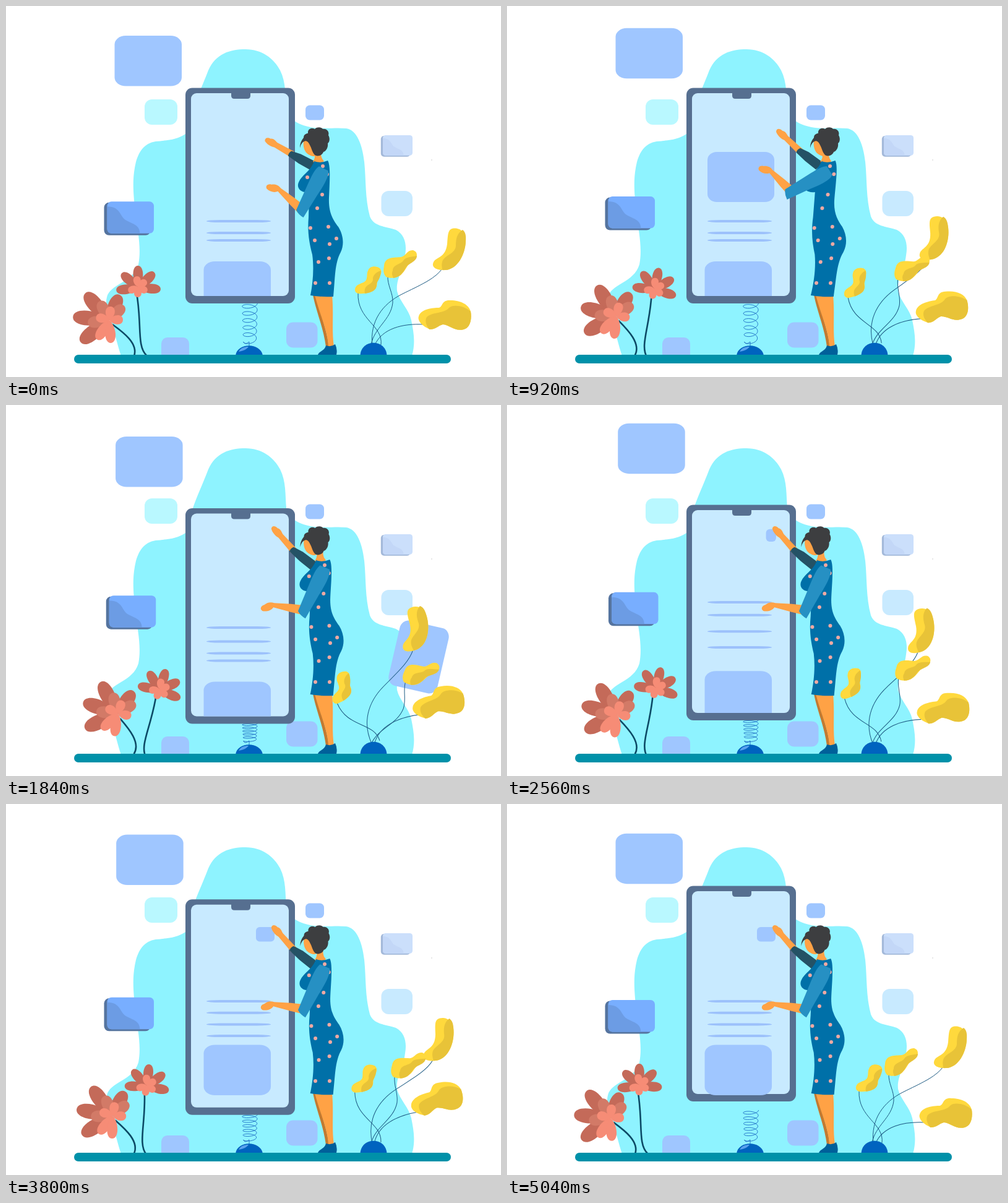
Write an HTML page that moves like this. It is 800 by 600 pixels and loops after 5.08 s.

```html
<!DOCTYPE html>
<html lang="en">
<head>
<meta charset="utf-8">
<title>Building an app screen</title>
<style>
html, body { margin: 0; width: 100%; height: 100%; overflow: hidden; background: #fff; }
svg { display: block; width: 800px; height: 600px; }
.tile { fill: #9fc6ff; }
.skin { fill: #ffa245; }
.stem { fill: none; stroke: #0c4a66; stroke-width: 2.6; }
.thin { fill: none; stroke: #1c5a82; stroke-width: 1; }
.leaf { fill: #ffd93d; }
.shade { fill: #e8c338; }
.dots { fill: none; stroke: #efa9a3; stroke-width: 6; stroke-linecap: round; }
</style>
</head>
<body>
<svg viewBox="0 0 800 600">
  <defs>
    <clipPath id="clip"><rect id="clipRect" x="299" width="158" rx="8"/></clipPath>
  </defs>

  <path fill="#8ef3ff" d="M186 566C180 548 177 532 170 512C164 496 160 482 163 471C168 449 205 448 214 418C219 392 213 365 209 335C206 305 204 285 208 262C212 238 222 222 242 219C264 217 276 216 290 207L301 170C308 148 318 128 327 104C339 77 362 70 387 70C414 70 433 85 443 104C453 124 451 145 453 167C458 184 470 191 492 196C515 200 530 196 550 198C568 201 576 226 579 252C582 280 580 310 588 340C594 357 613 356 630 362C645 370 648 386 645 403C642 428 630 441 632 461C636 478 651 490 655 508C659 528 662 545 656 566Z"/>
  <circle cx="688" cy="249" r=".7" fill="#bbb"/>

  <rect id="bigTile" class="tile" width="108.5" height="81.5" rx="18" ry="14"/>
  <rect x="224" y="151" width="53" height="41" rx="12" fill="#b9f8ff"/>
  <rect class="tile" x="484" y="160.5" width="30" height="24" rx="7"/>
  <rect x="606.5" y="299" width="50.5" height="41" rx="12" fill="#c8eaff"/>
  <rect class="tile" x="251" y="536" width="45" height="40" rx="10"/>
  <rect class="tile" x="453" y="511.5" width="50.5" height="41" rx="11"/>
  <g id="blueBlock">
    <rect x="-5" y="1.5" width="75" height="53" rx="8" fill="#55749f"/>
    <rect width="75.5" height="51.5" rx="7" fill="#78aeff"/>
    <path fill="#6c9ce4" d="M0 8C22 8 20 24 30 30C42 37 52 37 53 51.5H7Q0 51 0 44Z"/>
  </g>
  <g transform="translate(609 209) scale(.636)">
    <rect x="-5" y="1.5" width="75" height="53" rx="8" fill="#a3b9da"/>
    <rect width="75.5" height="51.5" rx="7" fill="#cbdffb"/>
    <path fill="#c3d7f7" d="M0 8C22 8 20 24 30 30C42 37 52 37 53 51.5H7Q0 51 0 44Z"/>
  </g>

  <path id="spring" fill="none" stroke="#1f6fc4" stroke-width=".9"/>
  <path fill="#0063bf" d="M371 565C374 544 411 544 415 565Z"/>
  <path fill="#5aa2ee" d="M376 559C379 553 385 551 392 551C388 556 383 558 376 559Z"/>

  <g id="phone">
    <rect x="290" y="132.5" width="177" height="348.5" rx="11" fill="#566f90"/>
    <rect x="299" y="141" width="158" height="328" rx="9" fill="#c8eaff"/>
    <path fill="#566f90" d="M364 140H395V145Q395 150 390 150H369Q364 150 364 145Z"/>
  </g>
  <g clip-path="url(#clip)">
    <rect id="card" class="tile" x="319.5" width="108.5" height="81.5" rx="18" ry="14"/>
    <g id="lines" fill="#9cc1fb"></g>
  </g>
  <rect id="thrown" class="tile" x="-54" y="-40.5" width="108" height="81" rx="15" ry="13"/>
  <rect id="pinned" class="tile" rx="6"/>

  <path fill="#c27a31" d="M496 467H503C508 500 519 525 522 551H517C513 520 500 490 496 467Z"/>
  <path class="skin" d="M499 467H527C530 500 526 522 530 551H521C520 525 506 496 499 467Z"/>
  <path fill="#00609a" d="M517 549Q525 552 532 547Q536 555 534 564H504C506 558 515 558 517 549Z"/>
  <path id="backFore" class="skin" d="M-3 -5L28 -4C33 -6 41 -6 46 -3C49 1 46 5 40 5C36 8 32 6 28 5L-3 6Z"/>
  <path id="backSleeve" fill="#245265" d="M-4 -8L28 -7.5L44 -4.5Q47 1 45 5L24 7.5L0 8Z"/>
  <g id="body">
    <path class="skin" d="M499 238H509Q509 246 514 251L506 256L496 252Q500 246 499 238Z"/>
    <path fill="#0070a8" d="M498 251Q508 255 520 250C525 258 523 285 522 310C521 335 529 346 537 357C545 370 547 385 541 398C531 416 532 440 529 470Q510 471 492 468C496 448 498 424 495 402C490 383 487 365 489 342L490 301C476 303 469 294 473 285C478 273 492 268 498 251Z"/>
    <path class="dots" d="M512 259h0M519 272h0M487 277h0M511 305h0M503 327h0M492 359h0M521 357h0M499 379h0M534 376h0M523 385h0M505 414h0M522 408h0M500 448h0M523 448h0"/>
  </g>
  <path id="frontFore" class="skin" d="M-3 -8L20 -4L48 2C51 -3 58 -6 65 -5C70 -3 69 3 63 5C59 9 53 11 47 9L20 9L-3 8Z"/>
  <path id="frontSleeve" fill="#2690c3" d="M-4 -9C4 -13 15 -12 30 -11L78 -7Q83 0 83 9L40 11C20 13 0 13 -5 7Z"/>
  <g id="head">
    <path class="skin" d="M481 218H490C495 224 498 232 502 241C498 246 489 241 485 237C481 231 480 226 481 218Z"/>
    <path fill="#3d3e40" d="M475 230C475 221 478 217 481 213C481 208 485 206 488 206C487 199 494 196 499 199C503 195 510 196 512 199C518 198 523 203 521 209C524 214 523 220 520 222C521 229 517 235 513 236C511 242 503 244 499 241C495 237 494 230 491 225C489 220 485 217 482 219C478 221 476 225 475 230Z"/>
  </g>

  <g id="bigFlower"><path class="stem" d="M207 566C214 546 190 528 172 515"/></g>
  <g id="smallFlower"><path class="stem" d="M227 565C211 550 220 515 211 464"/></g>

  <g id="leafA">
    <path class="thin" d="M592 548C588 510 608 482 640 466C668 452 692 442 704 426"/>
    <path class="leaf" d="M719 361C727 357 744 361 743 381C742 402 730 425 711 427C699 428 686 424 691 414C696 405 710 408 713 385C714 372 714 364 719 361Z"/>
    <path class="shade" d="M738 362C728 368 727 378 727 388C726 400 712 402 706 411C703 418 705 422 705 427H711C730 425 742 402 743 381C744 370 742 365 738 362Z"/>
  </g>
  <g id="leafB">
    <path class="thin" d="M590 548C595 520 622 508 625 480C626 464 616 452 617 436"/>
    <path class="leaf" d="M611 420C612 405 628 407 638 406C646 405 648 394 658 395C667 398 665 408 658 412C648 417 648 425 640 433C633 441 620 441 614 438C609 432 610 426 611 420Z"/>
    <path class="shade" d="M664 404C655 406 645 406 642 412C638 418 625 418 625 428C622 434 626 438 626 440C636 439 642 431 645 425C649 416 664 414 664 404Z"/>
  </g>
  <g id="leafC">
    <path class="thin" d="M606 548C610 516 567 508 569 464"/>
    <path class="leaf" d="M585 428C588 420 598 420 604 424C608 428 607 433 603 438C597 446 602 448 598 456C593 464 580 466 569 465C562 463 563 456 567 452C574 447 582 448 583 440C584 434 583 432 585 428Z"/>
    <path class="shade" d="M606 428C598 430 592 436 593 443C592 450 582 450 580 458Q579 462 580 465C592 463 598 460 599 452C598 446 606 442 606 428Z"/>
  </g>
  <g id="leafD">
    <path class="thin" d="M596 548C608 522 640 513 676 515"/>
    <path class="leaf" d="M667 502C670 490 690 488 700 488C706 486 704 475 718 476C735 476 748 483 751 494C753 505 751 520 740 523C725 527 718 516 706 515C698 517 695 523 686 523C676 520 664 510 667 502Z"/>
    <path class="shade" d="M751 494C740 484 722 482 716 488C708 498 690 494 680 503C676 510 680 518 684 523C695 523 698 517 706 515C718 516 725 527 740 523C751 520 753 505 751 494Z"/>
  </g>
  <path fill="#0063bf" d="M572.5 565C574 538 614 538 615.5 565Z"/>
  <rect x="110" y="564" width="609" height="14" rx="7" fill="#0091a9"/>
</svg>
<script>
const LOOP = 5080, STEP = 40;
const REACH = 920, REST = 1840;
const $ = id => document.getElementById(id);

function set(el, attrs) {
  for (const name in attrs) el.setAttribute(name, attrs[name]);
}
function add(parent, tag, attrs) {
  const el = document.createElementNS('http://www.w3.org/2000/svg', tag);
  set(el, attrs);
  return parent.appendChild(el);
}
const move = (id, transform) => $(id).setAttribute('transform', transform);
const degrees = (x, y) => Math.atan2(y, x) * 180 / Math.PI;
const mix = (a, b, u) => a + (b - a) * u;

// Eased 0 to 1, and eased up to a peak and back.
function ramp(t, from, to) {
  const u = Math.min(1, Math.max(0, (t - from) / (to - from)));
  return u * u * (3 - 2 * u);
}
const pulse = (t, from, peak, to) => t < peak ? ramp(t, from, peak) : 1 - ramp(t, peak, to);

// The woman moves from a start pose through a reach to a resting pose.
const pose = (t, start, reach, rest) =>
  t < REACH ? mix(start, reach, ramp(t, 0, REACH)) : mix(reach, rest, ramp(t, REACH, REST));
const joint = (...poses) => t => [0, 1].map(axis => pose(t, ...poses.map(p => p[axis])));

// Petals spread evenly between two angles.
function fan(id, x, y, fill, count, from, to, length, width) {
  const h = width * .66;
  for (let i = 0; i < count; i++) {
    const angle = mix(from, to, count > 1 ? i / (count - 1) : 0);
    add($(id), 'path', {
      fill, transform: `translate(${x} ${y}) rotate(${angle})`,
      d: `M0 0C${length * .3} ${-h} ${length} ${-h} ${length} 0C${length} ${h} ${length * .3} ${h} 0 0Z`
    });
  }
}
const DARK = '#c46a59', MID = '#d27a67', LIGHT = '#f68c76';
fan('bigFlower', 165, 508, DARK, 3, -130, -219, 57, 24);
fan('bigFlower', 165, 508, DARK, 1, -65, -65, 45, 22);
fan('bigFlower', 166, 508, MID, 3, -43, -188, 34, 19);
fan('bigFlower', 167, 508, LIGHT, 2, 122, 86, 37, 17);
fan('bigFlower', 167, 508, LIGHT, 3, -2, -166, 22, 15);
fan('smallFlower', 214, 456, DARK, 5, -186, 3, 36, 16);
fan('smallFlower', 213, 454, LIGHT, 5, -97, 152, 17, 12);

const lineStarts = [325.5, 348, 367, 379];
const lines = lineStarts.map(() => add($('lines'), 'rect', { x: 324, width: 104, height: 4, rx: 22, ry: 2 }));

const backElbow = joint([460, 239], [472, 234], [463, 234]);
const frontElbow = joint([477, 329], [459, 300], [480, 332]);
const limbs = [
  ['backFore', backElbow, joint([420, 216], [437, 201], [431, 198]), 46, 1],
  ['backSleeve', joint([497, 259], [504, 258], [498, 261]), backElbow, 43, -1],
  ['frontFore', frontElbow, joint([422, 290], [408, 260], [412, 328]), 68, 1],
  ['frontSleeve', joint([512, 267], [518, 269], [514, 267]), joint([477, 330], [456, 301], [480, 333]), 74, -1]
];

const swings = {
  bigFlower: t => 13 * swell(t),
  smallFlower: t => 18.5 * swell(t),
  leafA: t => -19 * pulse(t, 0, REST, 5040),
  leafB: t => 15.2 * pulse(t, 0, REST, 3360) + 10.7 * pulse(t, 3360, 4200, 5040),
  leafC: t => -24.8 * pulse(t, 0, REST, 3700) - 7.6 * pulse(t, 3360, 4280, 5040),
  leafD: t => -11 * pulse(t, 0, 1600, 3100) - 12.5 * pulse(t, 2200, 3850, LOOP)
};
const swell = t => t < REST ? Math.sin(t / REST * Math.PI / 2) : 1 - (t - REST) / (LOOP - REST);

function springPath(top) {
  const turns = 5.5, steps = 120, height = 543 - top;
  let d = '';
  for (let i = 0; i <= steps; i++) {
    const u = i / steps, a = u * turns * 2 * Math.PI;
    const x = 394 + (12.5 - 2 * u) * Math.cos(a), y = top + height * u + height * .09 * Math.sin(a);
    d += `${i ? 'L' : 'M'}${x.toFixed(1)} ${y.toFixed(1)}`;
  }
  return d + 'Q386 549 393 543V550';
}

function drawTiles(t) {
  const tileY = 51 - 15.5 * pulse(t, -400, 1040, 1840) - 23 * pulse(t, 1840, 2700, 3650) - 16 * pulse(t, 3650, 4460, 5280);
  move('bigTile', `translate(${175.5 + 5 * pulse(t, 920, 3360, 4280)} ${tileY})`);
  const blockY = 317 - 9 * pulse(t, -200, 1000, 2700) - 14 * pulse(t, 1400, 2600, 3360) - 9 * pulse(t, 3360, 4280, 5040);
  move('blueBlock', `translate(${163.5 + 5.5 * pulse(t, 920, 2560, 3360)} ${blockY})`);
}

function drawPhone(t) {
  const drop = 34.5 * ramp(t, 1000, 1800) - 8 * ramp(t, 1840, 3000) - 26.5 * ramp(t, 3360, 5000);
  move('phone', `translate(0 ${drop})`);
  set($('clipRect'), { y: 141 + drop, height: t < 3360 ? 328 : 400 });
  // The spring stays behind when the phone lifts off.
  const top = 480 + drop;
  set($('spring'), { d: springPath(t < 2500 ? top : Math.max(495, top)) });

  // Screen parts settle one after another.
  const settle = (start, end, i) => mix(start + drop, end, ramp(t, 1880 + 120 * i, 2530 + 120 * i));
  lines.forEach((line, i) => set(line, { y: settle(lineStarts[i], 319 + 18.7 * i, i) - 2 }));
  set(lines[0], { width: 104 * ramp(t, 1440, 1720) });
  set($('card'), { y: settle(413, 389.5, 4) });

  // One tile pops up on the screen, then is flung off to the right.
  const fling = Math.max(0, (t - 1400) / 440);
  const size = t > 2300 ? 0 : ramp(t, 360, 680);
  move('thrown', `translate(${378 + 289 * fling} ${276.5 + 40 * fling + 91 * fling ** 2}) rotate(${103 * fling}) scale(${size})`);

  const grow = ramp(t, 2380, 2720);
  set($('pinned'), { x: 436 - 32 * grow, y: 203 - 4 * grow, width: 30 * grow, height: grow && 16 + 7.5 * grow });
}

function drawWoman(t) {
  const lean = pose(t, 0, .053, .016);
  move('body', `matrix(1 0 ${-lean} 1 ${448 * lean} 0)`);
  move('head', `translate(${pose(t, 0, 15, .5)} 0)`);
  for (const [id, from, to, length, flip] of limbs) {
    const [x, y] = from(t), [endX, endY] = to(t), dx = endX - x, dy = endY - y;
    move(id, `translate(${x} ${y}) rotate(${degrees(dx, dy)}) scale(${Math.hypot(dx, dy) / length} ${flip})`);
  }
}

function drawPlants(t) {
  for (const id in swings) {
    const pivot = id.startsWith('leaf') ? '593 550' : '214 564';
    move(id, `rotate(${swings[id](t)} ${pivot})`);
  }
}

function frame() {
  const t = Math.floor(performance.now() % LOOP / STEP) * STEP;
  drawTiles(t);
  drawPhone(t);
  drawWoman(t);
  drawPlants(t);
  requestAnimationFrame(frame);
}
frame();
</script>
</body>
</html>
```
